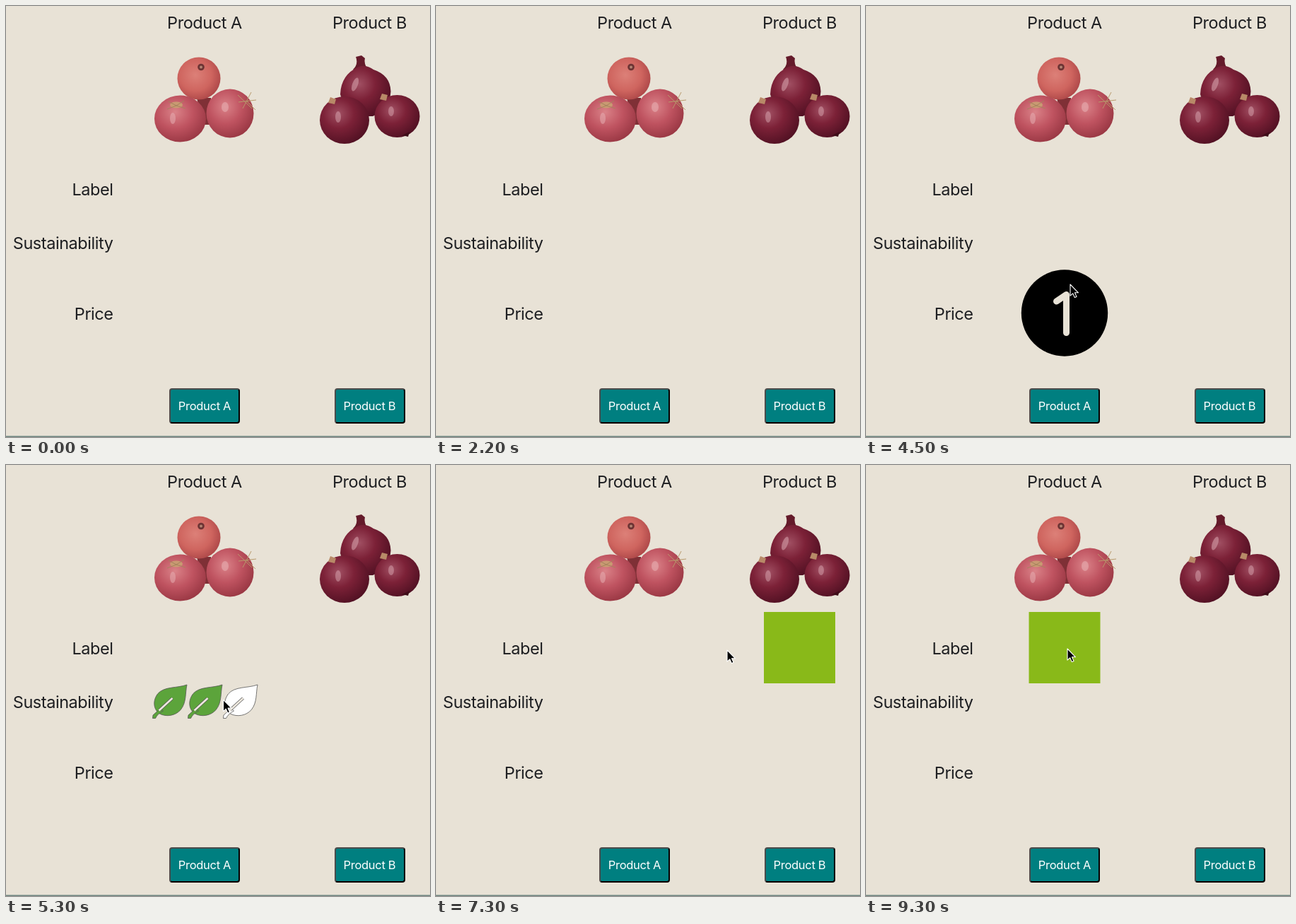
An HTML page that plays this animation: 600x610 px, repeating every 9400 ms.

```html
<!DOCTYPE html>
<html lang="en">
<head>
<meta charset="utf-8">
<title>Product comparison</title>
<style>
  html, body { margin: 0; width: 600px; height: 610px; overflow: hidden; background: #e8e2d6; }
  body { position: relative; font-family: Inter, Roboto, sans-serif; letter-spacing: -.019em; }
  svg { position: absolute; left: 0; top: 0; }
  text { font-size: 23.5px; fill: #1d1e21; letter-spacing: -.019em; }
  .button {
    position: absolute; top: 541px; width: 100px; height: 50px; box-sizing: border-box;
    border: 2px solid; border-color: #4c4c4c #000 #000 #4c4c4c; border-radius: 4px;
    background: #007f80; color: #fff; font-size: 16.5px; line-height: 46px; text-align: center;
  }
</style>
</head>
<body>
<svg width="600" height="610" viewBox="0 0 600 610">
  <defs>
    <radialGradient id="coral" cx=".42" cy=".42" r=".62">
      <stop offset="0" stop-color="#dc8078"/><stop offset=".6" stop-color="#cf655f"/><stop offset="1" stop-color="#ad4748"/>
    </radialGradient>
    <radialGradient id="pink" cx=".4" cy=".36" r=".7">
      <stop offset="0" stop-color="#da8288"/><stop offset=".5" stop-color="#bf5360"/><stop offset="1" stop-color="#963541"/>
    </radialGradient>
    <radialGradient id="wine" cx=".38" cy=".36" r=".7">
      <stop offset="0" stop-color="#a04f62"/><stop offset=".45" stop-color="#7c2137"/><stop offset="1" stop-color="#4f1022"/>
    </radialGradient>
    <g id="leaf" stroke="#565656" stroke-width=".8">
      <path d="M49.5 1C36 6 17 3 8 14C0 25 3 37 11 42C20 47 34 45 41 36C49 26 47 13 49.5 1Z"/>
      <path d="M1.5 44L12 34.5L16 38Q8 42 5 48.5H1Z"/>
      <path d="M11 36.5L29 20" fill="none" stroke-width="4"/>
      <path d="M10 37.5L29 20" fill="none" stroke="#eee9df" stroke-width="2.6"/>
    </g>
  </defs>

  <path d="M0 609.3H600" stroke="#6f8580" stroke-width="1.4"/>
  <g text-anchor="middle">
    <text x="281" y="32">Product A</text>
    <text x="514.5" y="32">Product B</text>
  </g>
  <g text-anchor="end">
    <text x="151.5" y="268">Label</text>
    <text x="151.5" y="343.5">Sustainability</text>
    <text x="151.5" y="444">Price</text>
  </g>

  <!-- Light onions -->
  <g>
    <path d="M270 130H290V168H278Z" fill="#7f3036"/>
    <ellipse cx="273" cy="102.5" rx="30.5" ry="30" fill="url(#coral)"/>
    <ellipse cx="317" cy="152" rx="33.5" ry="34.5" fill="url(#pink)"/>
    <ellipse cx="246.5" cy="159.5" rx="36.5" ry="33" fill="url(#pink)"/>
    <circle cx="276" cy="86.500" r="4.800" fill="#6d3434"/>
    <circle cx="276" cy="86.500" r="2" fill="#b18472"/>
    <ellipse cx="241" cy="140" rx="9" ry="4.500" fill="#c99a72"/>
    <path d="M230 135L241 141L252 134M228 146L241 141L254 145" fill="none" stroke="#a5835c"/>
    <path d="M328 126L348 145M329 136L354 133M335 145L347 122M340 134L353 147" fill="none" stroke="#b89a6c"/>
    <ellipse cx="310" cy="143" rx="5" ry="7" fill="#e6adb0" opacity=".6"/>
    <ellipse cx="236" cy="159" rx="4" ry="8" fill="#e6adb0" opacity=".55"/>
  </g>

  <!-- Dark onions -->
  <g>
    <path d="M495 72L503 70L508 74Q506 82 512 90H491Q499 82 495 72Z" fill="#641a2a"/>
    <path d="M499 86Q508 82 520 90Q544 98 544.500 121Q543 147 519 156Q481 158 473 125Q474 97 499 86Z" fill="url(#wine)"/>
    <ellipse cx="553.5" cy="156" rx="32" ry="30" fill="url(#wine)"/>
    <path d="M561 183L571 178L569 185Z" fill="#3d0d18"/>
    <ellipse cx="479" cy="161.500" rx="35" ry="33.500" fill="url(#wine)"/>
    <path d="M456 137L459 129L467 132L465 139Z M529 132L532 124L540 126L538 134Z" fill="#b88a68"/>
    <ellipse cx="494" cy="111" rx="4" ry="10" fill="#d8a5af" opacity=".55" transform="rotate(20 494 111)"/>
    <ellipse cx="470" cy="157" rx="4" ry="8" fill="#d8a5af" opacity=".5"/>
    <ellipse cx="545" cy="149" rx="4" ry="7" fill="#d8a5af" opacity=".5"/>
  </g>

  <g id="cells"></g>
  <path id="cursor" d="M0 0V16.200L3.700 12.800L6.300 18.600L9 17.400L6.500 11.800H11.500Z"
        fill="#000" stroke="#fff" stroke-width="1.100" stroke-linejoin="round"/>
</svg>
<div class="button" style="left:231px">Product A</div>
<div class="button" style="left:464.500px">Product B</div>

<script>
const LOOP = 9400, STEP = 100, COLUMN_SPLIT = 398;
const ROW_BOTTOMS = [309, 366, 610];

// Cursor stops: time in ms, x, y
const path = [
  [2500, 590, 474], [2900, 508, 462], [3200, 445, 470], [3400, 401, 468],
  [3800, 315, 446], [4100, 288, 418], [4500, 289, 394], [4800, 285, 346],
  [5200, 283, 334], [5800, 430, 324], [6100, 457, 321], [6400, 475, 300],
  [6700, 492, 265], [7000, 465, 262], [7300, 412, 262], [7700, 310, 260],
  [8100, 285, 260], [9400, 285, 260]
];

const label = '<rect x="-50.500" y="208" width="101" height="101" fill="#89b919"/>';
const leaves = count => [0, 1, 2].map(i =>
  `<use href="#leaf" x="${i * 50 - 74.500}" y="310" fill="${i < count ? '#5ca43b' : '#fff'}"/>`).join('');
const price = digit => `<circle cy="434.500" r="61.200"/>
  <path d="${digit}" fill="none" stroke="#e8e2d6" stroke-width="9" stroke-linecap="round" stroke-linejoin="round"/>`;

const columns = [
  { x: 281, rows: [label, leaves(2), price('M-11.500 418L2.500 408.500V462.500')] },
  { x: 514.5, rows: [label, leaves(1), price('M-13.500 408H13.500L-3.500 430A17.500 17.500 0 1 1 -13.500 459.500')] }
];

const cellLayer = document.getElementById('cells');
const cursor = document.getElementById('cursor');
cellLayer.innerHTML = columns.map(({ x, rows }) =>
  rows.map(row => `<g transform="translate(${x})">${row}</g>`).join('')).join('');
const cells = [...cellLayer.children];

function cursorAt(t) {
  const next = path.findIndex(stop => stop[0] > t);
  if (next < 1) return null;
  const [t0, x0, y0] = path[next - 1], [t1, x1, y1] = path[next];
  const k = (t - t0) / (t1 - t0);
  return { x: x0 + (x1 - x0) * k, y: y0 + (y1 - y0) * k };
}

function draw(now) {
  const t = Math.floor((now % LOOP) / STEP) * STEP;
  const point = cursorAt(t);
  let hovered = -1;
  if (point) {
    const column = point.x < COLUMN_SPLIT ? 0 : 1;
    hovered = column * 3 + ROW_BOTTOMS.findIndex(bottom => point.y < bottom);
    cursor.setAttribute('transform', `translate(${point.x} ${point.y})`);
  }
  cursor.style.display = point ? '' : 'none';
  cells.forEach((cell, i) => cell.style.display = i === hovered ? '' : 'none');
  requestAnimationFrame(draw);
}
draw(performance.now());
</script>
</body>
</html>
```
